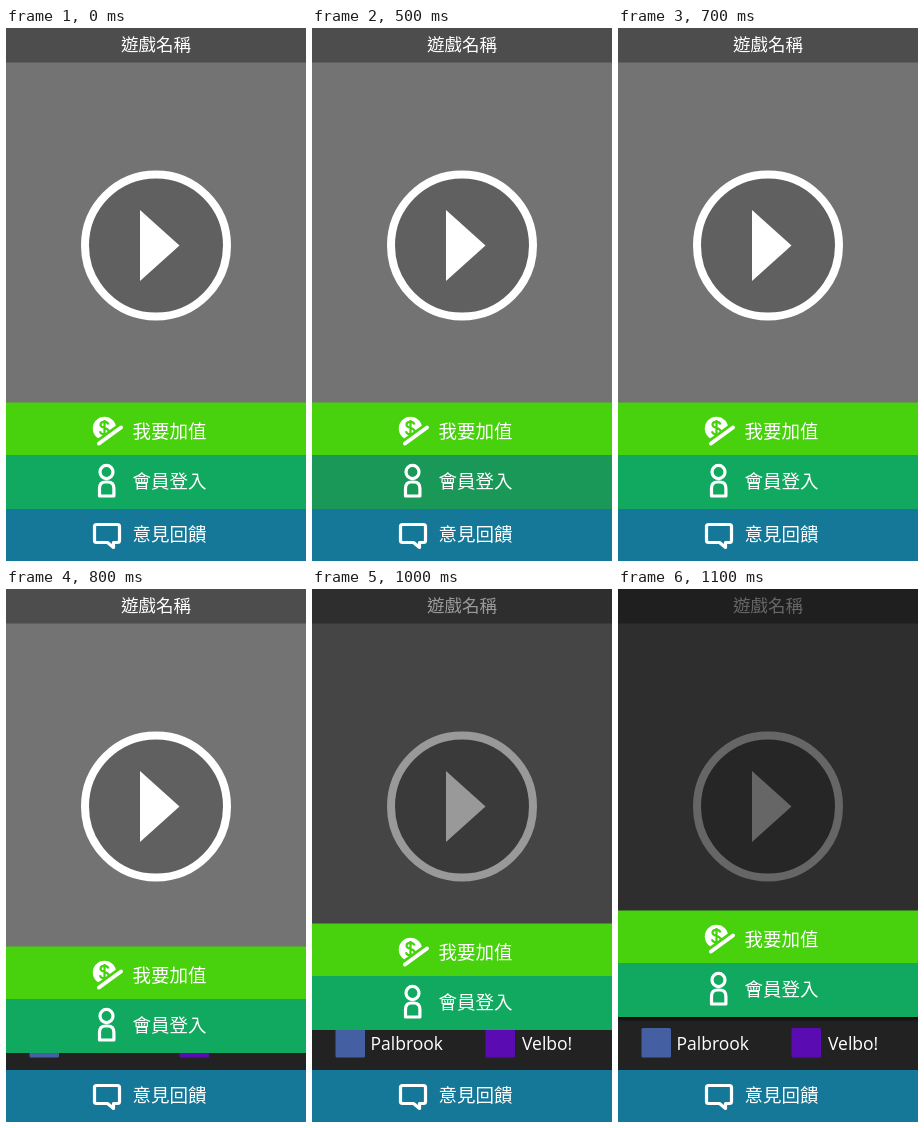
Write an HTML page that moves like this. It is 300x533 px and loops after 3.1 s.

```html
<!DOCTYPE html>
<html lang="zh-Hant">
<head>
<meta charset="utf-8">
<style>
  html, body { margin: 0; width: 100%; height: 100%; overflow: hidden; background: #222; }
  svg { display: block; width: 100vw; height: 100vh; }
  text { fill: #fff; font: 18.5px "Noto Sans CJK TC", "Noto Sans CJK JP", "Noto Sans CJK", sans-serif; }
  .title { font-size: 17.5px; }
  .site { font: 17.5px "Open Sans", sans-serif; }
  .icon { fill: none; stroke: #fff; stroke-width: 3.2; stroke-linejoin: round; }
</style>
</head>
<body>
<svg viewBox="0 0 300 533">
  <defs>
    <linearGradient id="shade" x2="0" y2="1">
      <stop stop-color="#000" stop-opacity=".75"/>
      <stop offset="1" stop-color="#000" stop-opacity="0"/>
    </linearGradient>
  </defs>

  <!-- game screen -->
  <rect width="300" height="427" fill="#737373"/>
  <rect width="300" height="34.500" fill="#4d4d4d"/>
  <text class="title" x="150" y="23" text-anchor="middle">遊戲名稱</text>
  <circle cx="150" cy="217.5" r="71" fill="#606060" stroke="#fff" stroke-width="8"/>
  <path d="M134 182L173.500 217.500 134 253z" fill="#fff"/>
  <rect id="dim" width="300" height="427" opacity="0"/>

  <!-- sign-in options -->
  <rect y="427" width="300" height="54" fill="#222"/>
  <rect y="428" width="300" height="5" fill="url(#shade)"/>
  <rect x="23.500" y="439" width="29.500" height="29.500" rx="1.500" fill="#4560a2"/>
  <text class="site" x="58.5" y="460.5">Palbrook</text>
  <rect x="173.500" y="439" width="29.500" height="29.500" rx="1.500" fill="#5a0cb2"/>
  <text class="site" x="210" y="460.5">Velbo!</text>

  <!-- sliding buttons -->
  <g id="slide">
    <rect y="374.500" width="300" height="53" fill="#47d20d"/>
    <circle cx="98.500" cy="400.500" r="11.700" fill="#fff"/>
    <path d="M102.500 396.500c-1-3.500-8-3.500-8 .2 0 4 8.300 2.600 8.300 6.700 0 4-8 4-8.800-.2M98.500 392v16"
          fill="none" stroke="#47d20d" stroke-width="2.200"/>
    <path d="M93 415.500L115 399.500" stroke="#47d20d" stroke-width="9"/>
    <path d="M93 415.500L115 399.500" stroke="#fff" stroke-width="4" stroke-linecap="round"/>
    <text x="126.500" y="410">我要加值</text>

    <rect id="login" y="427" width="300" height="54"/>
    <g class="icon">
      <ellipse cx="100.500" cy="444" rx="6.500" ry="6.600"/>
      <path d="M93.500 468V460.500q0-6.500 6-6.500h2.400q6 0 6 6.500v7.500z"/>
    </g>
    <text x="126.500" y="459.700">會員登入</text>
  </g>

  <!-- feedback button -->
  <rect y="481" width="300" height="52" fill="#167898"/>
  <path class="icon" d="M90.500 496.500h21q2 0 2 2v14q0 2-2 2h-4v5l-6-5h-11q-2 0-2-2v-14q0-2 2-2z"/>
  <text x="126.500" y="513.300">意見回饋</text>
</svg>
<script>
  const LOOP = 3100, STEP = 100;
  const el = id => document.getElementById(id);
  const up = [17, 32, 40, 53];      // slide positions from 800 ms on
  const idle = [17, 168, 95], pressed = [26, 152, 88];

  function draw(ms) {
    const step = Math.floor(ms % LOOP / STEP);
    const lift = step < 8 ? 0 : up[Math.min(step - 8, 3)];
    const press = step === 5 ? 1 : step === 6 ? 0.5 : 0;
    const dim = Math.min(Math.max(step - 8, 0), 3) * 0.2;
    el('slide').setAttribute('transform', `translate(0 ${-lift})`);
    el('dim').setAttribute('opacity', dim);
    el('login').setAttribute('fill',
      `rgb(${idle.map((c, i) => Math.round(c + (pressed[i] - c) * press))})`);
  }

  const start = performance.now();
  function tick() {
    draw(performance.now() - start);
    requestAnimationFrame(tick);
  }
  tick();
</script>
</body>
</html>
```
